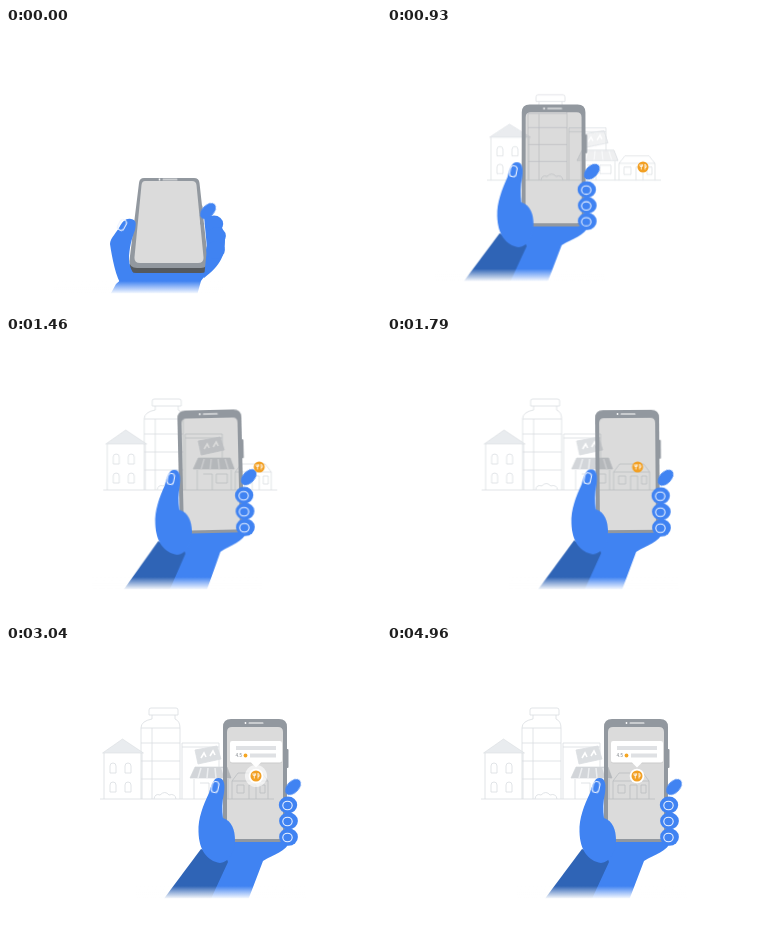
An HTML page without scripts that plays this animation: 375 by 281 pixels, repeating every 5040 ms.

```html
<!DOCTYPE html>
<html lang="en">
<head>
<meta charset="utf-8">
<title>Phone street view</title>
<style>
html, body { margin: 0; width: 100%; height: 100%; overflow: hidden; background: #fff; }
svg { display: block; width: 100vw; height: 100vh; }
svg * { animation: 0s linear infinite; }

.slide, .sway, .pan, .lift, .grip, .top, .fade, .frame, .glass, .edge, .thumb, .arm, .sleeve,
.web, .finger, .nails, .thumbnail, .town, .low, .tall, .tint, .pin, .card, .ring, .halo {
  animation-duration: 5040ms;
}
.skin { fill: #4083f2; }
.nail { fill: none; stroke: #e9f1ff; stroke-width: 1.1; }
.line { fill: none; stroke: #dadde1; stroke-width: .8; }
.pale { fill: #e9ecef; stroke: #dadde1; stroke-width: .6; }

/* sideways travel of the hand, and the small drift of the street */
.slide { animation-name: slide; }
@keyframes slide {
  0%, 18.45% { transform: translateX(-82px); animation-timing-function: ease-in-out; }
  40.4%, 100% { transform: none; }
}
.sway { transform-origin: 250px 160px; animation-name: sway; }
@keyframes sway {
  0%, 18.45% { transform: none; animation-timing-function: ease-in-out; }
  28.5% { transform: rotate(-1.3deg); animation-timing-function: ease-in-out; }
  40.4%, 100% { transform: none; }
}
.pan { animation-name: pan; }
@keyframes pan {
  0%, 18.45% { transform: translateX(6px); animation-timing-function: ease-in-out; }
  40.4%, 100% { transform: none; }
}

/* phone tilting upright */
.frame { fill: #92989f; fill-rule: evenodd; animation-name: frame; }
@keyframes frame {
  0% { animation-timing-function: ease-in; d: path("M220 150L270 150Q275 150 275.5 155L284 232Q284.5 240 277 240L213 240Q204.5 240 205.5 232L215 155Q215.5 150 220 150ZM221 153L268 153Q272 153 272.5 157L279.5 229Q280 235 274 235L216 235Q210 235 210.5 229L217.5 157Q218 153 221 153Z"); }
  11.31% { animation-timing-function: ease-out; d: path("M222 103L269 103Q276 103 276 110L278.5 209Q279 217 271 217L221 217Q213 217 213.3 209L215 110Q215 103 222 103ZM223 110L268 110Q273 110 273 115L275 208Q275 213 270 213L222 213Q217 213 217 208L218 115Q218 110 223 110Z"); }
  21.23%, 100% { d: path("M225 73L273 73Q281 73 281 81L281 188Q281 196 273 196L225 196Q217 196 217 188L217 81Q217 73 225 73ZM226 81L272 81Q277 81 277 86L277 188Q277 193 272 193L226 193Q221 193 221 188L221 86Q221 81 226 81Z"); }
}
.glass { fill: #000; fill-opacity: .14; animation-name: glass; }
@keyframes glass {
  0% { animation-timing-function: ease-in; d: path("M217 152L273 152L282 237L208 237Z"); }
  11.31% { animation-timing-function: ease-out; d: path("M217 106L274 106L277 215L215 215Z"); }
  21.23%, 100% { d: path("M220 77L278 77L278 194L220 194Z"); }
}
.edge { fill: #55595d; animation-name: edge; }
@keyframes edge {
  0% { animation-timing-function: ease-in; d: path("M205.5 236L284.2 236L284 240Q283 245 277 245L212 245Q206 245 205.5 240Z"); }
  11.31% { animation-timing-function: ease-out; d: path("M216 214L277 214L277 215Q276 217.6 271 217.6L222 217.6Q217 217.6 216 215Z"); }
  21.23%, 100% { d: path("M221 194L277 194L277 195Q276 195 273 195L225 195Q222 195 221 195Z"); }
}
.top { animation-name: top; }
@keyframes top {
  0% { transform: translate(-4px, 74.5px); animation-timing-function: ease-in; }
  11.31% { transform: translate(-3.5px, 30px); animation-timing-function: ease-out; }
  21.23%, 100% { transform: none; }
}

/* hand */
.lift { animation-name: lift; }
@keyframes lift {
  0% { transform: translate(0, 20px); animation-timing-function: ease-in; }
  11.31% { transform: translate(-3px, 20px); animation-timing-function: ease-out; }
  21.23%, 100% { transform: none; }
}
.grip { transform-origin: 280px 195px; animation-name: grip; }
@keyframes grip {
  0% { transform: none; animation-timing-function: ease-in; }
  11.31% { transform: translateX(1px) scaleY(.92); animation-timing-function: ease-out; }
  21.23%, 100% { transform: none; }
}
.thumb { animation-name: thumb; }
@keyframes thumb {
  0% { animation-timing-function: ease-in; d: path("M186 196C186 190 194 183 196 178C199 173 202 170 207 171C213 172 212 176 211 182C208 190 205 200 205 212C206 220 208 223 210 226C208 234 204 238 198 238C192 230 188 210 186 196Z"); }
  11.31% { animation-timing-function: ease-out; d: path("M193 186C193 172 198 160 201 147C202 140 203 132 209 132C215 132 216 140 215 147C213 156 214 164 215 172C225 175 228 184 228 194C228 206 223 216 214 217C201 215 194 204 193 186Z"); }
  21.23%, 100% { d: path("M192.500 186C192 172 197 160 203 147C205 140 207 132 212.500 132C219 132 219 140 218 147C216 156 216 164 217 172C226 175 229 184 229 194C229 206 223 216 214 217C201 215 193 204 192.500 186Z"); }
}
.arm { animation-name: arm; }
@keyframes arm {
  0% { animation-timing-function: ease-in; d: path("M208 222L284 222C282 228 279 230 277 233L268 265L176 265L192 236Z"); }
  11.31%, 100% { d: path("M214 195L284 195C280 206 268 208 257 215L236 270L197 270L222 216Z"); }
}
.sleeve { fill: #2f64b6; animation-name: sleeve; }
@keyframes sleeve {
  0% { animation-timing-function: ease-in; d: path("M194 236L202 238L182 265L178 265Z"); }
  11.31%, 100% { d: path("M195 203L224 214L198 270L145 270Z"); }
}
.web { animation-name: web; }
@keyframes web {
  0% { animation-timing-function: ease-in; d: path("M280 168C291 163 301 180 301 192C301 207 297 217 280 230L283 200Z"); }
  11.31%, 100% { d: path("M280 155C284 155 285 165 285 175C285 185 285 190 282 197L280 180Z"); }
}
.finger { animation-name: finger; }
@keyframes finger {
  0% { transform: translate(var(--x), var(--y)); animation-timing-function: ease-in; }
  11.31%, 100% { transform: none; }
}
.nails { animation-name: nails; }
@keyframes nails {
  0%, 3% { opacity: 0; }
  9%, 100% { opacity: 1; }
}
.thumbnail { transform-origin: 209px 141px; animation-name: thumbnail; }
@keyframes thumbnail {
  0% { transform: translate(-11px, 36px) rotate(28deg); animation-timing-function: ease-in; }
  11.31% { transform: translateX(-3.500px) rotate(5deg); animation-timing-function: ease-out; }
  21.23%, 100% { transform: rotate(12deg); }
}
.fade { animation-name: fade; }
@keyframes fade {
  0% { transform: translateY(13px); animation-timing-function: ease-in; }
  11.31% { transform: translateY(6px); animation-timing-function: ease-out; }
  21.23%, 100% { transform: none; }
}

/* street unfolding from the ground */
.town { animation-name: town; }
@keyframes town {
  0%, 5% { opacity: 0; transform: translateY(-8px); }
  11.31% { opacity: .6; transform: translateY(-8px); animation-timing-function: ease-out; }
  21.23%, 100% { opacity: 1; transform: none; }
}
.low, .tall { transform-origin: 150px 153px; }
.low { animation-name: low; }
@keyframes low {
  0%, 5% { transform: scaleY(0); }
  11.31% { transform: scaleY(.4); animation-timing-function: ease-out; }
  21.23%, 100% { transform: none; }
}
.tall { animation-name: tall; }
@keyframes tall {
  0%, 5% { transform: scaleY(.3); }
  11.31% { transform: scaleY(.65); animation-timing-function: ease-out; }
  22.5%, 100% { transform: none; }
}
.tint { animation-name: tint; }
@keyframes tint {
  0%, 11.31% { opacity: 0; }
  18.45% { opacity: .4; }
  26%, 100% { opacity: 1; }
}

/* marker and card */
.pin { transform-origin: 250px 130px; animation-name: pin; }
@keyframes pin {
  0%, 14% { transform: translateY(18px) scale(0); animation-timing-function: ease-out; }
  18.45% { transform: translateY(9px); animation-timing-function: ease-out; }
  24%, 100% { transform: none; }
}
.card { transform-origin: 250px 122px; animation-name: card; }
@keyframes card {
  0%, 38.69% { transform: scale(0); animation-timing-function: ease-out; }
  43.25%, 100% { transform: none; }
}
.ring { transform-origin: 250px 130px; animation-name: ring; }
@keyframes ring {
  0%, 37% { transform: scale(.6); }
  41%, 100% { transform: none; }
}
.halo { transform-origin: 250px 130px; opacity: 0; animation-name: halo; }
@keyframes halo {
  0%, 53.77% { opacity: 0; transform: scale(.65); }
  60.32% { opacity: .65; transform: none; }
  64.48% { opacity: 0; transform: none; }
  64.5%, 73.02% { opacity: 0; transform: scale(.65); }
  80% { opacity: .6; transform: scale(.85); }
  87.1%, 100% { opacity: 0; transform: scale(.85); }
}
</style>
</head>
<body>
<svg viewBox="0 0 375 281" xmlns="http://www.w3.org/2000/svg">
  <defs>
    <linearGradient id="mist" x2="0" y2="1">
      <stop stop-color="#fff" stop-opacity="0"/>
      <stop offset="1" stop-color="#fff"/>
    </linearGradient>
    <path id="window" d="M0 10V3a3 3 0 0 1 6 0V10Z"/>
  </defs>

  <g class="pan"><g class="town">
    <path class="line" d="M94 153H268"/>
    <g class="tall line">
      <path d="M143 64q0-2 2-2h25q2 0 2 2v5h-29zM146 69v4q-11 2-11 9v71M169 69v4q5 2 5 9v71M135 82h39M135 97h39M135 115h39M135 133h39M146 82v71"/>
    </g>
    <g class="low">
      <path class="line" d="M98 107V153M136 107V153"/>
      <path class="pale" d="M96.500 107L116.500 93L137.500 107Z"/>
      <g class="line">
        <use href="#window" x="104" y="117"/><use href="#window" x="119" y="117"/>
        <use href="#window" x="104" y="136"/><use href="#window" x="119" y="136"/>
        <path d="M148 153q1-6 6-4q5-5 9 0q6-2 7 4"/>
        <path d="M176 153V97H213V121M176 101H213M188 133V153M222 133V153M194 137h9v16M207 137h11v9h-11z"/>
        <path d="M226 153V135L232 127H256L262 135V153M226 135H262M231 139h7v8h-7zM243 153V139h7v14M254 139h5v8h-5z"/>
        <path d="M189 104L211 100L215 113L192 118ZM189 121H221L225 132H184Z"/>
      </g>
      <g class="tint">
        <path fill="#dcdfe2" d="M189 104L211 100L215 113L192 118Z"/>
        <path fill="none" stroke="#fff" stroke-width="1.6" d="M195 112l3-5 2 4M204 110l3-5 2 4"/>
        <path fill="#d2d5d9" d="M189 121H221L225 132H184Z"/>
        <path stroke="#eceef0" stroke-width="1.5" d="M195 122l-3 10M202 122l-1 10M209 122l1 10M216 122l3 10"/>
      </g>
    </g>
  </g></g>

  <g class="slide">
    <g class="sway">
      <g class="lift">
        <path class="sleeve"/>
        <path class="arm skin"/>
      </g>
      <path class="edge"/>
      <path class="glass"/>
      <g class="top"><rect x="280" y="103" width="2.500" height="19" rx="1" fill="#92989f"/></g>
      <path class="frame"/>
      <g class="top" fill="#fff">
        <circle cx="239.500" cy="77" r=".9"/>
        <rect x="242.500" y="76.400" width="15" height="1.200" rx=".6"/>
      </g>
      <g class="lift">
        <path class="web skin"/>
        <g class="grip">
          <g class="skin">
            <g class="finger" style="--x:-3px;--y:22px"><ellipse cx="287" cy="141" rx="6" ry="9.400" transform="rotate(44 287 141)"/></g>
            <ellipse class="finger" style="--x:8px;--y:17px" cx="282" cy="159" rx="9.200" ry="8.400"/>
            <ellipse class="finger" style="--x:10px;--y:13px" cx="282.500" cy="175" rx="9.400" ry="8.400"/>
            <ellipse class="finger" style="--x:9px;--y:11px" cx="282.500" cy="191" rx="9.400" ry="8.800"/>
          </g>
          <g class="nails nail">
            <ellipse cx="281.500" cy="159.500" rx="4.700" ry="4.200"/>
            <ellipse cx="281.500" cy="175.500" rx="4.700" ry="4.200"/>
            <ellipse cx="281.500" cy="191.500" rx="4.700" ry="4.200"/>
          </g>
        </g>
        <path class="thumb skin"/>
        <rect class="thumbnail nail" x="205.800" y="135.500" width="6.600" height="11" rx="3"/>
      </g>
    </g>
    <g class="fade">
      <rect x="130" y="240" width="170" height="13" fill="url(#mist)"/>
      <rect x="130" y="252.500" width="170" height="60" fill="#fff"/>
    </g>
  </g>

  <g class="pan">
    <g class="card">
      <rect x="224" y="95.600" width="52" height="22" rx="2.500" fill="#000" fill-opacity=".07"/>
      <path fill="#fff" d="M226 95H274q2 0 2 2V114.500q0 2-2 2H255L250 121.500L245 116.500H226q-2 0-2-2V97q0-2 2-2Z"/>
      <path stroke="#dfe1e4" stroke-width="4" d="M230 102H270M244 109.500H270"/>
      <text x="229.500" y="111.200" font-family="Roboto, sans-serif" font-size="4.600" fill="#80868b">4.5</text>
      <circle cx="239.500" cy="109.500" r="1.900" fill="#f5a623"/>
    </g>
    <g class="pin">
      <circle class="halo" cx="250" cy="130" r="11" fill="#fff"/>
      <circle class="ring" cx="250" cy="130" r="7.300" fill="#fff"/>
      <circle cx="250" cy="130" r="5.500" fill="#f2a024"/>
      <path fill="none" stroke="#fff" stroke-width=".8" d="M247 127.300v2h2.600v-2M248.300 127.300v5.200M252 132.500v-5.200q1.400 1 1.200 3h-1.200"/>
    </g>
  </g>
</svg>
</body>
</html>
```
